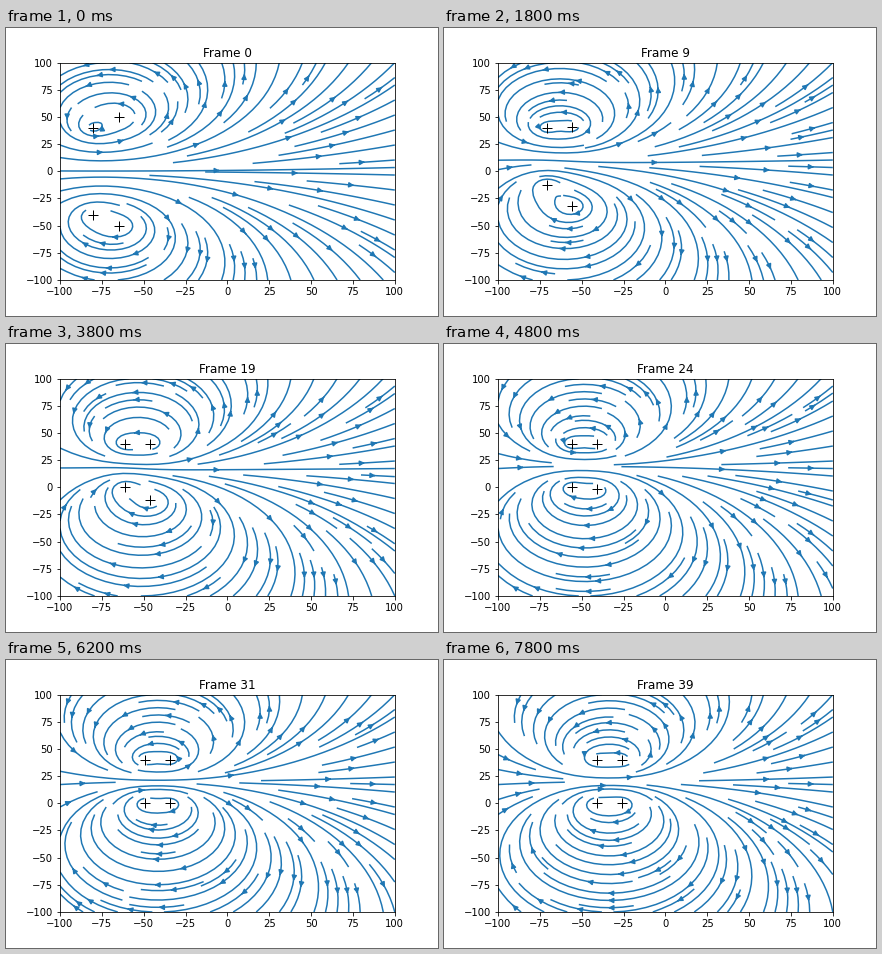
A matplotlib script that plays this animation: 432x288 px, repeating every 8000 ms.

```python
import numpy as np
import matplotlib.pyplot as plt
from matplotlib.animation import FuncAnimation

FRAMES = 40
STEP_MS = 200
LIMIT = 100

axis = np.linspace(-LIMIT, LIMIT, 100)
X, Y = np.meshgrid(axis, axis)


def vortices(n):
    """Position and spin of each vortex: (x, y, spin)."""
    left, right = n - 80, n - 65
    return [
        (left, 40, 1),
        (right, max(50 - n, 40), 1),
        (left, min(3 * n - 40, 0), -1),
        (right, min(2 * n - 50, 0), -1),
    ]


def field(points):
    u, v = np.zeros_like(X), np.zeros_like(Y)
    for x, y, spin in points:
        dx, dy = X - x, Y - y
        r2 = dx**2 + dy**2 + 1e-9
        u -= spin * dy / r2
        v += spin * dx / r2
    return u, v


fig, ax = plt.subplots(figsize=(6, 4), dpi=72)
fig.subplots_adjust(left=0.125, right=0.9, bottom=0.125, top=0.88)


def reset():
    ax.clear()
    return []


def draw(n):
    ax.clear()
    points = vortices(n)
    ax.streamplot(X, Y, *field(points), color="C0", linewidth=1.5)
    xs, ys, _ = zip(*points)
    ax.plot(xs, ys, "k+", markersize=10, zorder=3)
    ax.set(xlim=(-LIMIT, LIMIT), ylim=(-LIMIT, LIMIT))
    ticks = np.arange(-LIMIT, LIMIT + 1, 25)
    ax.set_xticks(ticks)
    ax.set_yticks(ticks)
    ax.set_title(f"Frame {n}")
    return []


anim = FuncAnimation(fig, draw, frames=FRAMES, init_func=reset,
                     interval=STEP_MS, repeat=True, repeat_delay=0)
plt.show()
```
